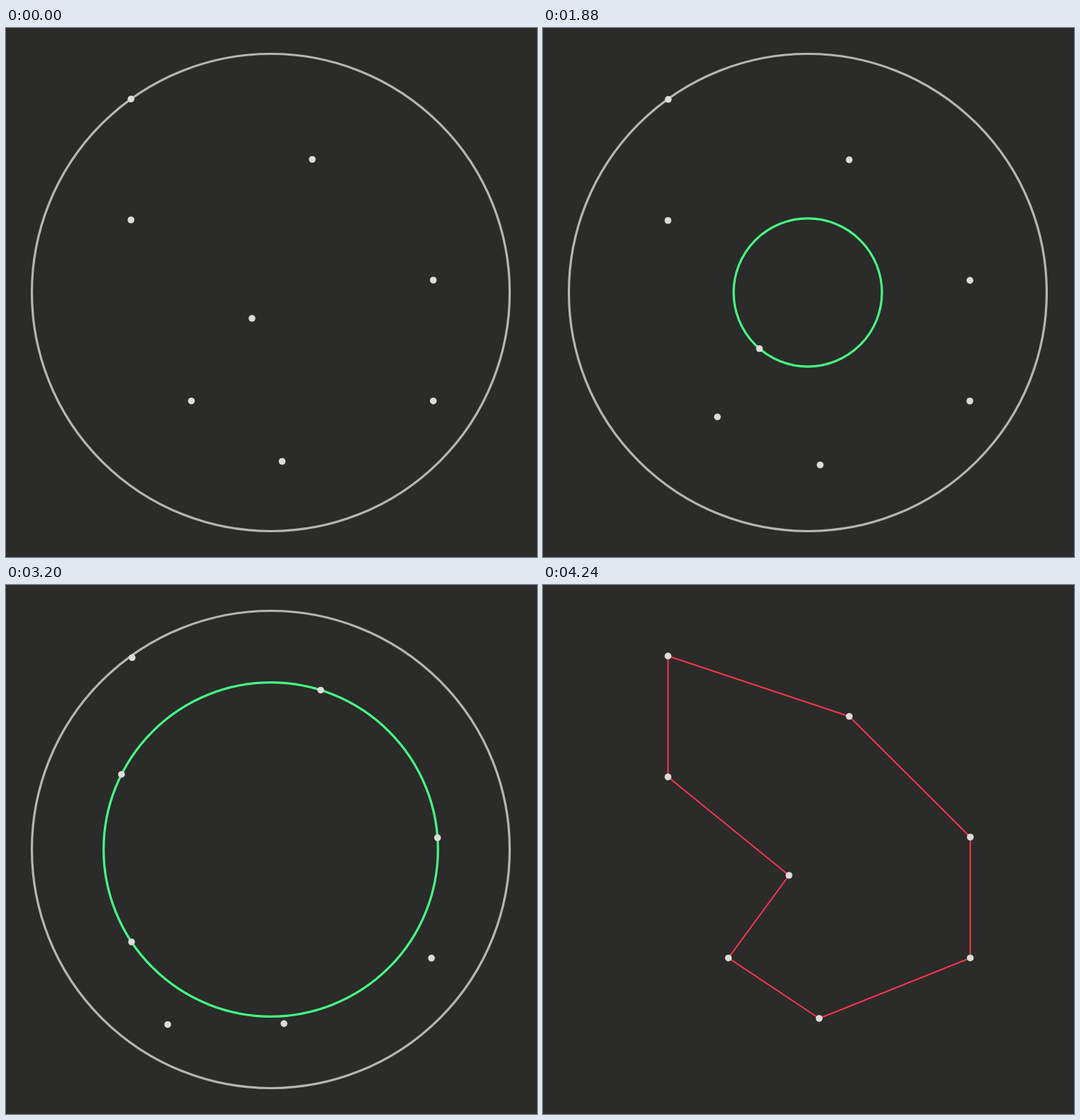
These frames come from a looping animation (749 px wide and 747 px high, 5920 ms). An HTML page with a canvas:

```html
<!DOCTYPE html>
<html lang="en">
<head>
<meta charset="utf-8">
<title>Points on a growing circle</title>
<style>
  html, body { margin: 0; width: 100%; height: 100%; overflow: hidden; background: #2b2b2a; }
  canvas { display: block; width: 749px; height: 747px; }
</style>
</head>
<body>
<canvas id="stage" width="749" height="747"></canvas>
<script>
const ctx = document.getElementById('stage').getContext('2d');
const LOOP = 5920, STEP = 40, START = 880, END = 4240;
const C = 373.5, OUTER = 337;

// Time and radius of the growing circle
const growth = [[880, 1.5], [2600, 178.8], [3200, 235.8], [4200, 336]];

// Start place, then how far each point turns (degrees) and moves outwards
const points = [
  { x: 176.3, y: 100.3, turn: 0, push: -3 },
  { x: 432, y: 185.5, turn: 0.1, push: -2.8 },
  { x: 602.7, y: 356, turn: 0.35, push: -2.4 },
  { x: 602.7, y: 526.7, turn: 0.35, push: -2.2 },
  { x: 389.5, y: 612, turn: -0.5, turnAt: 880, push: 7.5, pushAt: 1400, pushSpan: 450 },
  { x: 261.5, y: 526.7, turn: -7, turnAt: 1680, push: 98, pushAt: 1400, pushSpan: 840 },
  { x: 347, y: 410, turn: 22, push: 0 },
  { x: 176.3, y: 271, turn: -0.8, push: -1.5 }
];

// Slow start, then a long approach to 1
function settle(t, at = 1305, span = 1170) {
  const u = Math.max(0, t - at) / span;
  return 1 - Math.exp(-u * u);
}

function radius(t) {
  const i = Math.max(1, growth.findIndex(([time]) => time >= t));
  const [t0, r0] = growth[i - 1], [t1, r1] = growth[i];
  return r0 + (r1 - r0) * (t - t0) / (t1 - t0);
}

// The growing circle carries along every point it reaches
function place(p, t, r) {
  const dx = p.x - C, dy = p.y - C;
  const angle = Math.atan2(dy, dx) + p.turn * settle(t, p.turnAt) * Math.PI / 180;
  const reach = Math.hypot(dx, dy) + p.push * settle(t, p.pushAt, p.pushSpan);
  const d = Math.max(reach, r);
  return [C + d * Math.cos(angle), C + d * Math.sin(angle)];
}

function ring(r, color) {
  ctx.beginPath();
  ctx.arc(C, C, r, 0, Math.PI * 2);
  ctx.lineWidth = 3.2;
  ctx.strokeStyle = color;
  ctx.stroke();
}

function outline(dots) {
  ctx.beginPath();
  dots.forEach(([x, y]) => ctx.lineTo(x, y));
  ctx.closePath();
  ctx.lineWidth = 2;
  ctx.lineJoin = 'round';
  ctx.strokeStyle = '#f5364c';
  ctx.stroke();
}

function draw(t) {
  const done = t >= END;
  const growing = t >= START && !done;
  const r = growing ? radius(t) : 0;
  const dots = points.map(p => place(p, growing ? t : START, r));

  ctx.fillStyle = '#2b2b2a';
  ctx.fillRect(0, 0, 749, 747);
  if (done) outline(dots);
  else ring(OUTER, '#b5b5b1');
  if (growing) ring(r, '#46fb84');

  ctx.fillStyle = '#dcdcd9';
  for (const [x, y] of dots) {
    ctx.beginPath();
    ctx.arc(x, y, 4.8, 0, Math.PI * 2);
    ctx.fill();
  }
}

const begin = performance.now();
function tick() {
  const t = (performance.now() - begin) % LOOP;
  draw(Math.floor(t / STEP) * STEP);
  requestAnimationFrame(tick);
}
tick();
</script>
</body>
</html>
```
